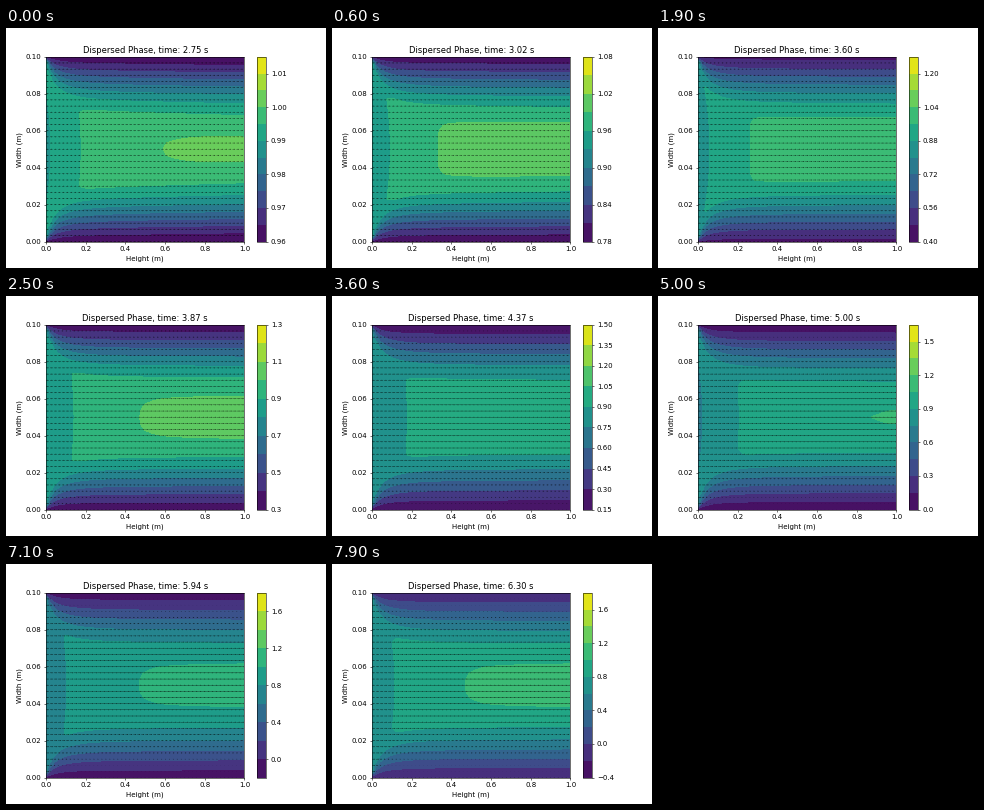
Recreate the animation shown at these times as a matplotlib script. Size 320x240 px, loop 8000 ms.

```python
import math

import matplotlib.pyplot as plt
import numpy as np
from matplotlib.animation import FuncAnimation
from matplotlib.ticker import MaxNLocator

FRAMES = 80
INTERVAL = 100
DT = 0.045
FIRST_STEP = 61
START = 2.70

# Velocity deficit at the wall and peak excess, against time since START
KEY_TIMES = [0, 0.045, 0.675, 1.17, 1.665, 2.295, 2.835, 3.6]
DEFICIT = [0, 0.0395, 0.45, 0.69, 0.84, 0.99, 1.09, 1.21]
EXCESS = [0, 0.0125, 0.17, 0.28, 0.37, 0.51, 0.58, 0.68]

x = np.linspace(0, 1, 51)
y = np.linspace(0, 0.1, 31)
X, Y = np.meshgrid(x, y)


def velocity_shape():
    """Developing channel profile: a slow core blended into wall layers."""
    eta = np.abs(Y - 0.05) / 0.05
    peak = 0.058
    core = 0.067 - 0.347 * np.exp(-(X + 0.06 * eta**2) / 0.286)
    power = 2 + 0.1 * np.exp(-X / 0.2) / (X + 0.002) + 0.08 * (1 - X)
    h = eta**power
    wall = peak - 1.033 * (h + 0.5 * h**2 * (1 - h))
    soft = 0.01 + 0.06 * X
    total = np.exp(-core / soft) - np.exp(-peak / soft) + np.exp(-wall / soft)
    return -soft * np.log(total)


def contour_levels(low, high):
    ticks = MaxNLocator(11, min_n_ticks=1).tick_values(low, high)
    first = np.nonzero(ticks <= low)[0][-1]
    last = np.nonzero(ticks >= high)[0][0]
    return ticks[first:last + 1]


SHAPE = velocity_shape()

fig = plt.figure(figsize=(6.4, 4.8), dpi=50)


def draw(i):
    t = (FIRST_STEP + i) * DT
    since = t - START
    deficit = np.interp(since, KEY_TIMES, DEFICIT)
    excess = np.interp(since, KEY_TIMES, EXCESS)
    u = 1 + deficit * (SHAPE - 0.045 * X * math.exp(-since / 0.3))

    fig.clear()
    ax = fig.add_subplot()
    levels = contour_levels(1 - deficit, 1 + excess)
    filled = ax.contourf(X, Y, u, levels=levels, cmap="viridis")
    fig.colorbar(filled)
    ax.quiver(X, Y, u, np.zeros_like(u), width=0.0015)
    ax.set_xlim(0, 1)
    ax.set_ylim(0, 0.1)
    shown = math.floor(t * 100 + 0.5 + 1e-6) / 100
    ax.set_title(f"Dispersed Phase, time: {shown:.2f} s")
    ax.set_xlabel("Height (m)")
    ax.set_ylabel("Width (m)")
    return []


anim = FuncAnimation(fig, draw, frames=FRAMES, interval=INTERVAL,
                     init_func=lambda: [], repeat=True, repeat_delay=0)
plt.show()
```
